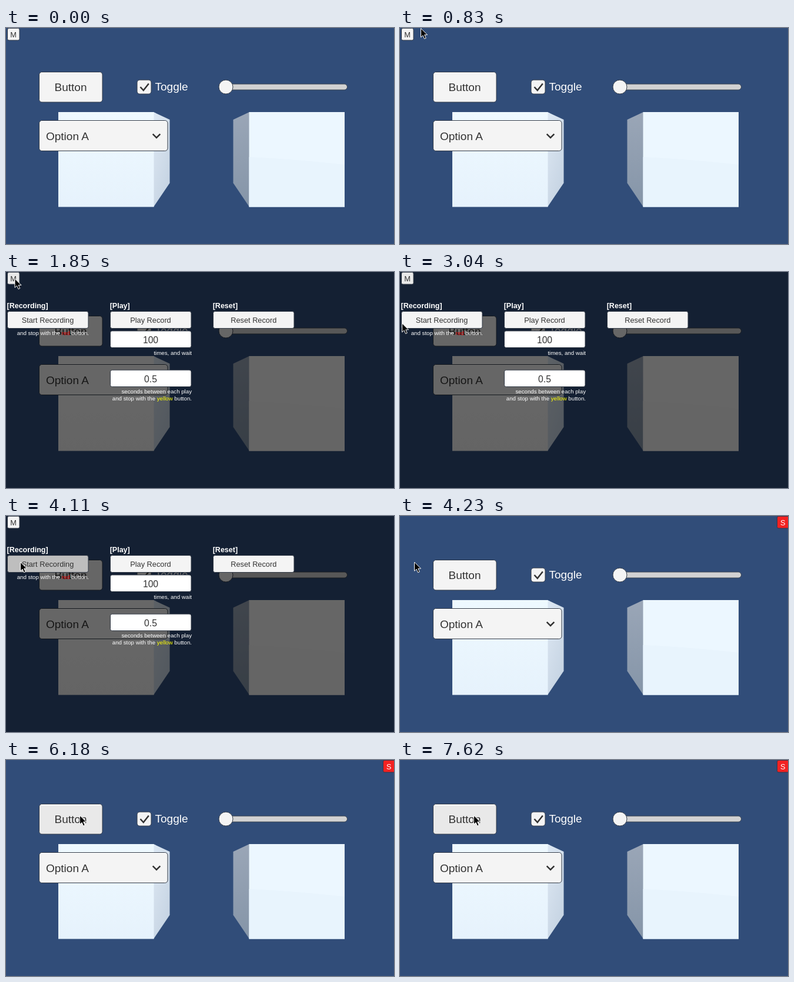
Recreate the animation shown at these times as an HTML page. Size 660 by 370 pixels, loop 8 s.

```html
<!DOCTYPE html>
<html lang="en">
<head>
<meta charset="utf-8">
<title>Macro recorder</title>
<style>
html, body { margin: 0; width: 100%; height: 100%; overflow: hidden; background: #314d79; }
svg { display: block; width: 660px; height: 370px; font-family: "Liberation Sans", Arial, sans-serif; }
text { fill: #323232; }
.widget { fill: #f4f4f4; stroke: #333b47; }
.shine { stroke: #fff; stroke-width: 1.6; }
.mark { fill: none; stroke: #323232; stroke-width: 2.5; }
.big { font-size: 19px; }
.label { font-size: 12.75px; text-anchor: middle; }
.value { font-size: 15.7px; text-anchor: middle; }
.title { font-size: 12.5px; font-weight: bold; fill: #fff; }
.note { font-size: 9.7px; text-anchor: end; fill: #fff; }
.white { fill: #fff; }
.menu-open .front { filter: grayscale(1); }
.hot { fill: #e9e9e9; }
.pressed { fill: #bebebe; }
.hidden { display: none; }
</style>
</head>
<body>
<svg id="stage" viewBox="0 0 660 370">
  <defs>
    <linearGradient id="leftFront" x2="0" y2="1">
      <stop stop-color="#eef9ff"/><stop offset="1" stop-color="#e6f2fc"/>
    </linearGradient>
    <linearGradient id="leftSide" x2=".6" y2="1">
      <stop stop-color="#dce8f4"/><stop offset=".5" stop-color="#d2deeb"/><stop offset="1" stop-color="#c6d4e3"/>
    </linearGradient>
    <linearGradient id="rightSide" x2="0" y2="1">
      <stop stop-color="#9aa6b7"/><stop offset="1" stop-color="#8595a8"/>
    </linearGradient>
  </defs>
  <rect width="660" height="370" fill="#314d79"/>

  <g id="cubes">
    <path fill="url(#leftSide)" d="M251 144 278.500 157V265.500L251 306.500z"/>
    <path class="front" fill="url(#leftFront)" d="M89 144H251.500V306.500H89z"/>
    <path fill="url(#rightSide)" d="M414 144 386.500 157V265.500L414 306.500z"/>
    <g class="front">
      <path fill="#ecf7ff" d="M413.500 144H576V306.500H413.500z"/>
      <path fill="#e8f4fd" d="M413.500 221Q500 225 576 234V306.500H413.500z"/>
    </g>
  </g>

  <g id="controls">
    <rect id="button" class="widget" x="56.500" y="75.500" width="107.500" height="51.500" rx="4.500"/>
    <path class="shine" d="M60 76.800H160.500"/>
    <text class="big" x="110" y="107.500" text-anchor="middle">Button</text>

    <rect class="widget" x="223" y="89" width="24" height="24" rx="4.500"/>
    <path class="mark" d="M228.500 101 233.800 106.800 242.800 95.300"/>
    <text class="big white" x="253.500" y="107">Toggle</text>

    <rect x="364" y="96" width="216.500" height="10" rx="5" fill="#d2d2d2" stroke="#39434f"/>
    <circle class="widget" cx="374" cy="101" r="12"/>

    <rect class="widget" x="56.500" y="158.500" width="218.500" height="52" rx="4.500"/>
    <path class="shine" d="M60 159.800H271.500"/>
    <text class="big" x="68" y="191.500">Option A</text>
    <path class="mark" d="M249.700 181.700 256 188 262.300 181.700"/>
  </g>

  <g id="menu" class="hidden">
    <rect width="660" height="370" fill="#000" opacity=".58"/>
    <text class="title" x="1.500" y="61.500">[Recording]</text>
    <text class="title" x="176.700" y="61.500">[Play]</text>
    <text class="title" x="351.700" y="61.500">[Reset]</text>

    <rect id="start" class="widget" x="2.500" y="67.500" width="137.500" height="29" rx="3"/>
    <text class="label" x="71" y="86.500">Start Recording</text>
    <text class="note" x="141" y="108">and stop with the <tspan fill="#e80000">red</tspan> button.</text>

    <rect class="widget" x="177.500" y="67.500" width="137.500" height="29" rx="3"/>
    <text class="label" x="246" y="86.500">Play Record</text>
    <rect class="widget white" x="177.500" y="101" width="137.500" height="28.500" rx="3"/>
    <text class="value" x="246" y="121.500">100</text>
    <text class="note" x="316" y="141.500">times, and wait</text>
    <rect class="widget white" x="177.500" y="168" width="137.500" height="28.500" rx="3"/>
    <text class="value" x="246" y="188.500">0.5</text>
    <text class="note" x="316" y="208">seconds between each play</text>
    <text class="note" x="316" y="219.500">and stop with the <tspan fill="#ff0">yellow</tspan> button.</text>

    <rect class="widget" x="352.500" y="67.500" width="137.500" height="29" rx="3"/>
    <text class="label" x="421.300" y="86.500">Reset Record</text>
  </g>

  <g id="opener">
    <rect id="openerBox" class="widget" x="2.500" y=".5" width="20.500" height="20.500" rx="2.500"/>
    <text class="label" x="12.600" y="15.500">M</text>
  </g>
  <g id="stopper" class="hidden">
    <rect x="641.500" y=".5" width="20" height="20.500" rx="2.500" fill="#f32222" stroke="#33364a"/>
    <text class="label white" x="651.300" y="15.500">S</text>
  </g>

  <path id="cursor" class="hidden" stroke="#fff" stroke-width="1" stroke-linejoin="round"
        d="M0 0V15.200L3.500 12 6 17.800 8.700 16.600 6.200 11H11z"/>
</svg>
<script>
const LOOP = 8000;
const el = id => document.getElementById(id);
const easeOut = p => 1 - (1 - p) ** 1.7;
const easeInOut = p => p * p * (3 - 2 * p);

// Each move jumps in equal time steps along a cubic curve.
const moves = [
  { from: 660, to: 1190, steps: 10, ease: easeOut, curve: [[51, -9], [42, -4], [26, 8], [15, 11.5]] },
  { from: 2810, to: 3270, steps: 9, ease: easeInOut, curve: [[15, 11.5], [-8, 60], [0, 125], [24.500, 79]] },
  { from: 4710, to: 5350, steps: 11, ease: easeInOut, curve: [[24.500, 79], [58, 82], [92, 93], [125.500, 95]] }
];

function bezier([a, b, c, d], p) {
  const q = 1 - p;
  return [0, 1].map(i => q ** 3 * a[i] + 3 * q * q * p * b[i] + 3 * q * p * p * c[i] + p ** 3 * d[i]);
}

function cursorAt(t) {
  const move = moves.filter(m => t >= m.from).pop();
  if (!move) return null;
  const interval = (move.to - move.from) / (move.steps - 1);
  const step = Math.min(move.steps, Math.floor((t - move.from) / interval + 0.001) + 1);
  return bezier(move.curve, move.ease(step / move.steps));
}

function show(id, visible) {
  el(id).classList.toggle("hidden", !visible);
}

function setState(id, state) {
  el(id).setAttribute("class", "widget " + state);
}

function draw(t) {
  const within = (a, b) => t >= a && t < b;
  const menuOpen = within(1850, 4230);
  el("stage").classList.toggle("menu-open", menuOpen);
  show("menu", menuOpen);
  show("opener", t < 4230);
  show("stopper", t >= 4230);

  setState("openerBox", within(1550, 1850) ? "pressed" : within(1850, 4110) ? "hot" : "");
  setState("start", within(4110, 4230) ? "pressed" : "");
  setState("button", within(5520, 6180) || within(7140, 7620) ? "pressed" : t >= 6180 ? "hot" : "");

  const tip = cursorAt(t);
  show("cursor", tip);
  if (tip) el("cursor").setAttribute("transform", `translate(${tip})`);
}

const origin = performance.now();
function tick() {
  draw((performance.now() - origin) % LOOP);
  requestAnimationFrame(tick);
}
tick();
</script>
</body>
</html>
```
